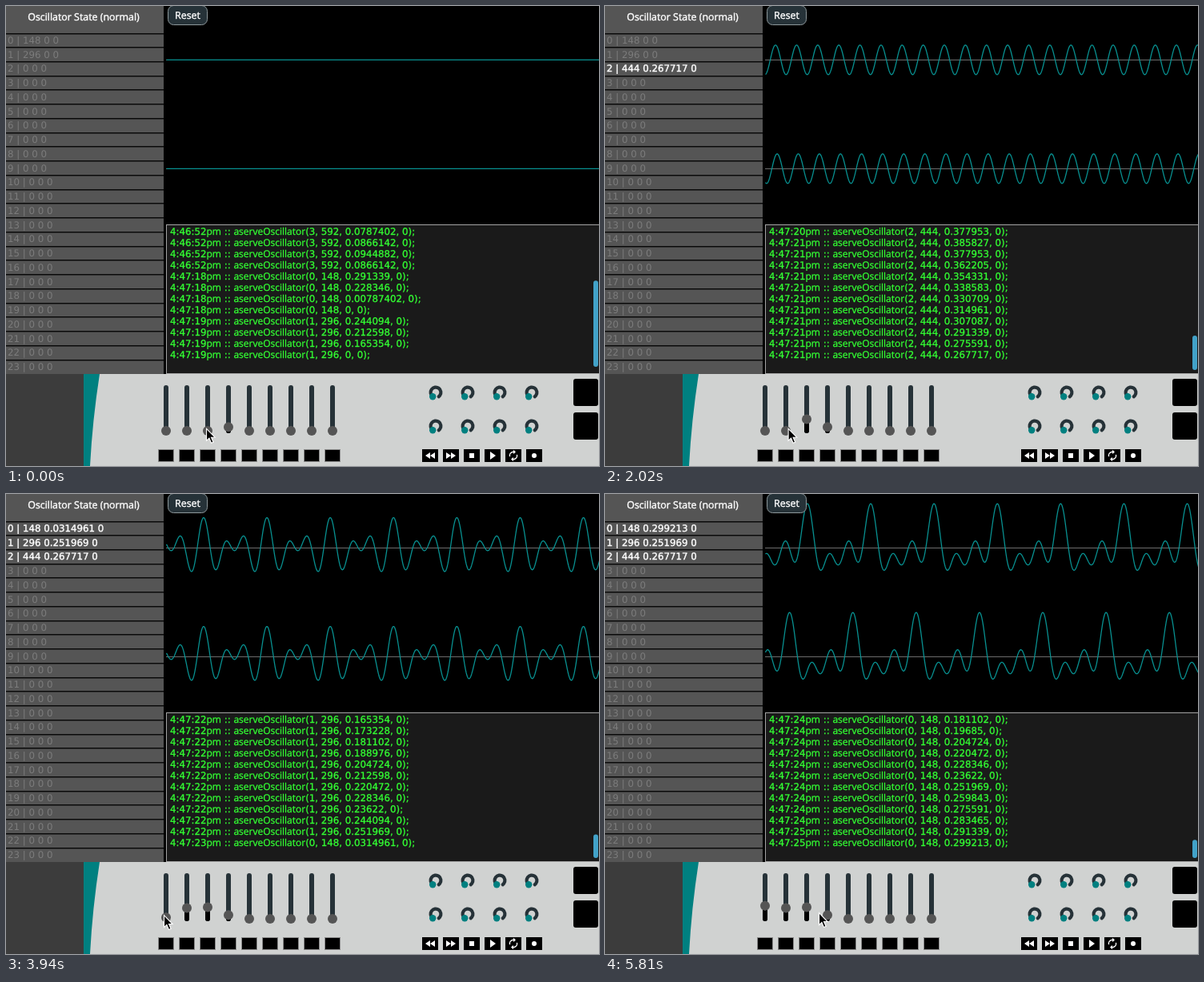
Animation of 741x575 px, one loop 5.91 s. Source, as an HTML page with a canvas:

```html
<!DOCTYPE html>
<html lang="en">
<head>
<meta charset="utf-8">
<title>Oscillator mixer</title>
<style>
  html, body { margin: 0; width: 100%; height: 100%; overflow: hidden; background: #000; }
  canvas { display: block; }
</style>
</head>
<body>
<canvas id="stage" width="741" height="575"></canvas>
<script>
const ctx = document.getElementById('stage').getContext('2d');
const TAU = Math.PI * 2;
const LOOP = 5910, STEP = 88, LAST = 66;
const TEAL = '#008080', SLATE = '#263238';

const stepAt = ms => Math.min(LAST, Math.floor((ms + 20) / STEP));

// Fader sweeps: oscillator, first step, last step, first value, last value, messages, easing power
const SWEEPS = [
  [2, 2, 7, 1, 17, 7, 1],
  [2, 8, 12.6, 20, 48, 9, 0.4],
  [2, 14, 17, 49, 35, 10, 1],
  [2, 18.6, 18.6, 34, 34, 1, 1],
  [1, 24.4, 28, 0.5, 11, 6, 1.3],
  [1, 28.4, 29, 14, 16, 2, 1],
  [1, 30, 35, 19, 32, 12, 0.95],
  [0, 45, 50, 4, 19, 7, 0.95],
  [0, 51, 59, 21, 37, 12, 0.95],
  [0, 61, 61, 38, 38, 1, 1]
];
const POINTER_X = [[0, 250], [14, 248], [19, 247], [24, 224], [36, 225], [42, 197], [61, 197], [66, 267]];
// Where the upper and lower scope traces have their main crest
const CRESTS = [[17, 209, 213.5], [28, 217, 217], [36, 259, 259], [45, 247, 247], [59, 270, 270], [66, 253.3, 231]];

function keyed(keys, step, column = 1) {
  const i = keys.findIndex(k => k[0] >= step);
  if (i <= 0) return keys[0][column];
  const a = keys[i - 1], b = keys[i];
  return a[column] + (b[column] - a[column]) * (step - a[0]) / (b[0] - a[0]);
}

const freq = osc => 148 * (osc + 1);
const amp = v => parseFloat((v / 127).toPrecision(6));
const logLine = (clock, osc, v) =>
  `4:${clock}pm :: aserveOscillator(${osc}, ${freq(osc)}, ${amp(v)}, 0);`;

const events = SWEEPS.flatMap(([osc, from, to, v0, v1, count, power]) =>
  Array.from({ length: count }, (_, i) => {
    const p = i / (count - 1 || 1);
    const at = from + (to - from) * p;
    const v = Math.ceil(v0 + (v1 - v0) * p ** power);
    const sec = 20 + Math.floor(at * STEP / 1000 - 0.13);
    return { osc, v, at: at - 0.01, line: logLine('47:' + sec, osc, v) };
  }));

const history = [['46:52', 3, [10, 11, 12, 11]], ['47:18', 0, [37, 29, 1, 0]], ['47:19', 1, [31, 27, 21, 0]]]
  .flatMap(([clock, osc, values]) => values.map(v => logLine(clock, osc, v)));

const faderValue = (state, i) => i === 3 ? 11 : i < 3 ? state[i].v : 0;
const handleY = v => 531 - v * 54 / 127;

function rect(color, x, y, w, h) {
  ctx.fillStyle = color;
  ctx.fillRect(x, y, w, h);
}

function round(color, x, y, w, h, r) {
  ctx.fillStyle = color;
  ctx.beginPath();
  ctx.roundRect(x, y, w, h, r);
  ctx.fill();
}

function disc(color, x, y, r) {
  ctx.fillStyle = color;
  ctx.beginPath();
  ctx.arc(x, y, r, 0, TAU);
  ctx.fill();
}

function poly(color, ...pts) {
  ctx.fillStyle = color;
  ctx.beginPath();
  for (let i = 0; i < pts.length; i += 2) ctx.lineTo(pts[i], pts[i + 1]);
  ctx.closePath();
  ctx.fill();
}

function arc(color, x, y, r, from, to, width) {
  ctx.strokeStyle = color;
  ctx.lineWidth = width;
  ctx.beginPath();
  ctx.arc(x, y, r, TAU * from, TAU * to);
  ctx.stroke();
}

const WORDS = '"Open Sans", sans-serif';
const DIGITS = '"DejaVu Sans", sans-serif';

function ink(str, x, y, color, font, weight) {
  ctx.font = font;
  ctx.fillStyle = ctx.strokeStyle = color;
  ctx.fillText(str, x, y);
  if (!weight) return;
  ctx.lineWidth = weight;
  ctx.strokeText(str, x, y);
}

// Words and figures use different faces on one baseline.
function text(str, x, y, color, weight = 0.4) {
  ctx.textAlign = 'left';
  for (const run of str.match(/[a-z]+|[^a-z]+/gi)) {
    ink(run, x, y, color, /[a-z]/i.test(run) ? '12px ' + WORDS : '11.8px ' + DIGITS, weight);
    x += ctx.measureText(run).width;
  }
}

function caption(str, x, y) {
  ctx.textAlign = 'center';
  ink(str, x, y, '#fff', '12.4px ' + WORDS, 0.4);
}

function drawList(state) {
  rect('#555', 0, 0, 197, 460);
  caption('Oscillator State (normal)', 97, 18);
  for (let i = 0; i < 24; i++) {
    const y = 34 + i * 17.74;
    const { v, used } = state[i] || { v: 0, used: false };
    rect('#0a0a0a', 0, Math.floor(y), 197, 1.5);
    text(`${i} | ${used ? freq(i) : 0} ${amp(v)} 0`, 2, Math.round(y + 13),
      v ? '#fff' : '#7c7c7c', v ? 0.4 : 0);
  }
}

function drawScope(cy, crest, state) {
  rect('#6c6c6c', 200, cy, 541, 1);
  const period = 79.1, phase = [0.35, -0.105, 0.066];
  ctx.strokeStyle = '#089090';
  ctx.lineWidth = 1.3;
  ctx.lineJoin = 'round';
  ctx.beginPath();
  for (let x = 200.5; x <= 742; x += 0.5) {
    const sum = state.reduce((s, { v }, i) =>
      s + amp(v) * Math.cos((i + 1) * TAU * (x - crest) / period + phase[i]), 0);
    ctx.lineTo(x, cy + 0.3 - 69 * sum);
  }
  ctx.stroke();
}

function drawReset() {
  round(SLATE, 202.5, -0.5, 49, 24, 7);
  ctx.strokeStyle = '#8e989b';
  ctx.lineWidth = 1;
  ctx.stroke();
  caption('Reset', 227, 16);
}

function drawLog(shown) {
  rect('#a4a4a4', 200, 273, 541, 187);
  rect('#1a1a1a', 201, 274, 540, 185);
  history.concat(shown.map(e => e.line)).slice(-12)
    .forEach((line, i) => text(line, 205, 286 + i * 14, '#33ff33', 0.3));
  const bottom = shown.length ? 455 : 451;
  const h = 1940 / (18 + shown.length);
  round('#42a2c8', 734, bottom - h, 6, h, 3);
}

function drawKnob(x, y) {
  ctx.lineCap = 'round';
  arc(SLATE, x, y, 6.4, 0.35, 1.15, 4.2);
  ctx.lineCap = 'butt';
  disc(TEAL, x - 3.8, y + 5.2, 4.2);
}

function drawTransport() {
  const w = '#fff';
  for (let i = 0; i < 6; i++) rect('#000', 520 + i * 26, 554, 20, 16);
  for (const d of [0, 6]) {
    poly(w, 524 + d, 562, 530 + d, 558, 530 + d, 566);
    poly(w, 550 + d, 558, 556 + d, 562, 550 + d, 566);
  }
  rect(w, 579, 559, 6, 6);
  poly(w, 605, 557, 612, 562, 605, 567);
  arc(w, 634, 562, 4.6, 0.46, 0.75, 1.4);
  arc(w, 634, 562, 4.6, -0.04, 0.25, 1.4);
  poly(w, 634, 554.8, 637, 557.4, 634, 560);
  poly(w, 634, 564, 631, 566.6, 634, 569.2);
  disc(w, 660, 562, 3);
}

function drawDeck(state) {
  rect('#3c3c3c', 0, 460, 97, 115);
  rect('#d0d2d1', 97, 460, 644, 115);
  ctx.fillStyle = TEAL;
  ctx.beginPath();
  ctx.moveTo(97, 460);
  ctx.lineTo(117, 460);
  ctx.quadraticCurveTo(108, 518, 105, 575);
  ctx.lineTo(97, 575);
  ctx.fill();

  for (let i = 0; i < 9; i++) {
    const x = 200 + i * 26;
    const v = faderValue(state, i), y = handleY(v);
    round(SLATE, x - 3, 474, 6, 60, 3);
    if (v) round('#000', x - 3, y, 6, 534 - y, 3);
    disc('#555', x, y, 6);
    rect('#8a8a8a', x - 10, 554, 20, 16);
    rect('#000', x - 9, 555, 18, 14);
  }
  for (let i = 0; i < 8; i++) drawKnob(537 + i % 4 * 40, i < 4 ? 483 : 525);
  for (const y of [466, 508]) round('#000', 709, y, 31, 34, 3);
  drawTransport();
}

// The pointer rides on the handle of the nearest fader.
function drawPointer(step, state) {
  const x = keyed(POINTER_X, step);
  const y = handleY(faderValue(state, Math.round((x - 198) / 26))) - 2.7;
  ctx.save();
  ctx.translate(x + 0.5, y);
  poly('#000', 0, 0, 0, 15, 3.4, 11.8, 6, 18, 8.6, 16.9, 6, 10.9, 10.6, 10.9);
  ctx.strokeStyle = '#fff';
  ctx.lineWidth = 1.1;
  ctx.lineJoin = 'miter';
  ctx.stroke();
  ctx.restore();
}

function draw(step) {
  const state = [0, 1, 2].map(i => ({ v: 0, used: i < 2 }));
  // The log trails the faders by half a step.
  for (const e of events)
    if (e.at <= step + 0.5) state[e.osc] = { v: e.v, used: true };

  rect('#000', 0, 0, 741, 575);
  drawScope(67, keyed(CRESTS, step, 1), state);
  drawScope(203, keyed(CRESTS, step, 2), state);
  drawReset();
  drawList(state);
  drawLog(events.filter(e => e.at <= step));
  drawDeck(state);
  drawPointer(step, state);
}

ctx.textRendering = 'geometricPrecision';
const start = performance.now();
let shownStep = -1;

function tick() {
  const step = stepAt((performance.now() - start) % LOOP);
  if (step !== shownStep) draw(shownStep = step);
  requestAnimationFrame(tick);
}
tick();
</script>
</body>
</html>
```
